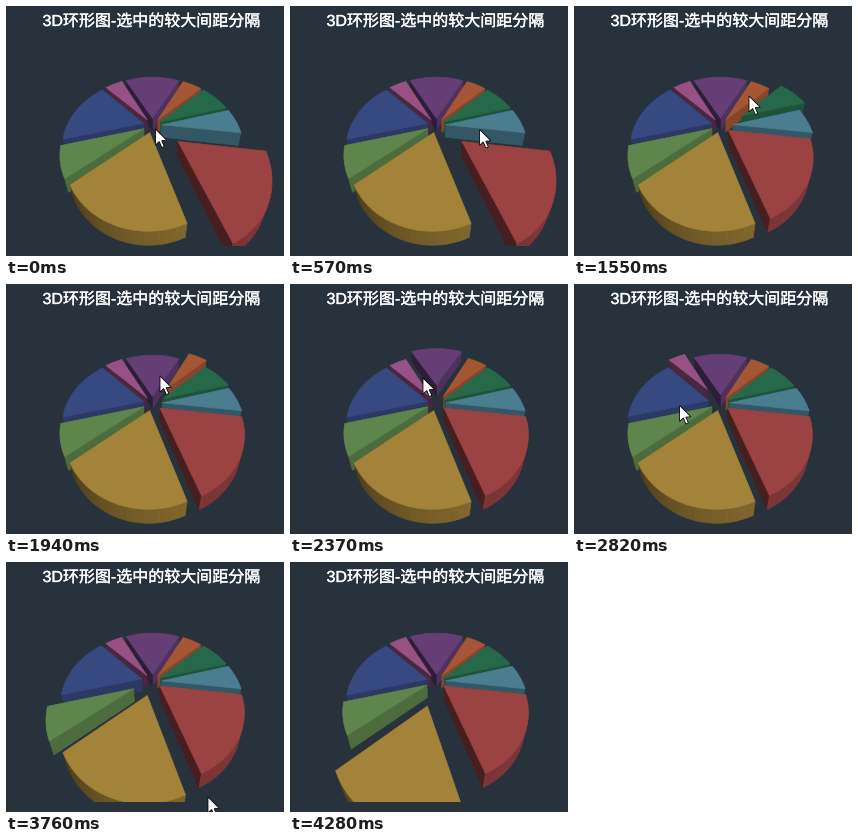
A matplotlib script for the animation above (4380 ms loop, 278x250 px).

```python
import numpy as np
import matplotlib.pyplot as plt
from matplotlib.animation import FuncAnimation
from matplotlib.collections import PolyCollection
from matplotlib.colors import to_rgb
from matplotlib.patches import Polygon, Rectangle
from matplotlib.patheffects import withStroke

W, H, DPI = 278, 250, 64
STEP, FRAMES = 60, 73
BG = "#28323c"

# slices run counterclockwise from START (degrees)
START = 134.5
SPANS = [60, 25, 69.5, 63.5, 23, 28, 19, 55, 17]
COLORS = ["#5470c6", "#91cc75", "#fac858", "#ee6666", "#73c0de",
          "#3ba272", "#fc8452", "#9a60b4", "#ea7ccc"]
N = len(SPANS)
EDGES = np.radians(START + np.cumsum([0] + SPANS))
BACK_TO_FRONT = np.argsort(-np.sin((EDGES[:-1] + EDGES[1:]) / 2))
RADIUS, REST, OUT = 0.89, 0.11, 0.352

# the selection steps around the ring at an even pace, red slice first
FIRST_PICK = 3
TAU = 220
MARKS = np.concatenate([[-np.inf], 750 + 413 * np.arange(N - 1), [np.inf]])

# pointer key points: time, x, y
PATH = np.array([
    (30, 149.5, 123), (120, 168, 130), (600, 191, 123), (930, 196, 95),
    (1530, 175, 90), (2370, 133, 94), (3000, 97, 130), (3270, 111, 167),
    (3750, 202, 235), (3900, 229, 253)])
ARROW = np.array([(0, 0), (0, 16), (3.7, 12.5), (6.3, 18.6), (8.8, 17.5),
                  (6.2, 11.7), (11.3, 11.4)])


def polar(radius, angle):
    return radius * np.stack([np.cos(angle), np.sin(angle)], axis=-1)


def project(pts, low=0):
    """Perspective view of plane points; low=1 is the underside."""
    x, y = pts.T
    w = 1 + 0.378 * y + 0.035 * low
    return np.column_stack([146.4 + 85.7 * x / w,
                            119.3 + (12.9 * low - 66.4 * y) / w])


def ease(u):
    return -np.expm1(-max(u, 0) / TAU)


def pulled(i, t):
    """How far slice i is pulled out at time t, from 0 to 1."""
    turn = (i - FIRST_PICK) % N
    return ease(t - MARKS[turn]) - ease(t - MARKS[turn + 1])


def wall_light(normal):
    return 0.30 + 0.23 * max(0, np.cos(normal + np.radians(50)))


def faces_front(quad):
    x, y = quad.T
    return np.sum(x * np.roll(y, -1) - np.roll(x, -1) * y) > 0


def slice_faces(i, t):
    """Visible walls of slice i, then its top, each with a colour."""
    a0, a1 = EDGES[i:i + 2]
    tip = polar(REST + (OUT - REST) * pulled(i, t), (a0 + a1) / 2)
    ring = np.vstack([tip, tip + polar(RADIUS, np.linspace(a0, a1, 24))])
    top, base = project(ring), project(ring, 1)
    rgb = np.array(to_rgb(COLORS[i]))
    for j in range(len(ring)):
        k = (j + 1) % len(ring)
        quad = np.array([top[j], top[k], base[k], base[j]])
        if faces_front(quad):
            dx, dy = ring[k] - ring[j]
            yield quad, rgb * wall_light(np.arctan2(-dx, dy))
    yield top, rgb * 0.65


plt.rcParams["font.family"] = ["Liberation Sans", "Noto Sans CJK JP"]
fig = plt.figure(figsize=(W / DPI, H / DPI), dpi=DPI, facecolor=BG)
ax = fig.add_axes([0, 0, 1, 1])
ax.set(xlim=(0, W), ylim=(H, 0))
ax.axis("off")

ax.text(36.5, 20, "3D环形图-选中的较大间距分隔", color="white",
        fontsize=16 * 72 / DPI, va="baseline",
        path_effects=[withStroke(linewidth=0.35, foreground="white")])
pie = PolyCollection([], linewidths=0.7, edgecolors="face")
ax.add_collection(pie, autolim=False)
pie.set_clip_path(Rectangle((0, 0), W, 240, transform=ax.transData))
pointer = ax.add_patch(Polygon(ARROW, facecolor="white", edgecolor="black",
                               linewidth=0.9, zorder=5))


def draw(n):
    t = (n + 0.5) * STEP
    faces = [f for i in BACK_TO_FRONT for f in slice_faces(i, t)]
    verts, colors = zip(*faces)
    pie.set_verts(verts)
    pie.set_facecolor(colors)
    key, x, y = PATH.T
    pointer.set_xy(ARROW + [np.interp(t, key, x), np.interp(t, key, y)])
    return pie, pointer


anim = FuncAnimation(fig, draw, frames=FRAMES, interval=STEP, repeat=True,
                     repeat_delay=0)
plt.show()
```
